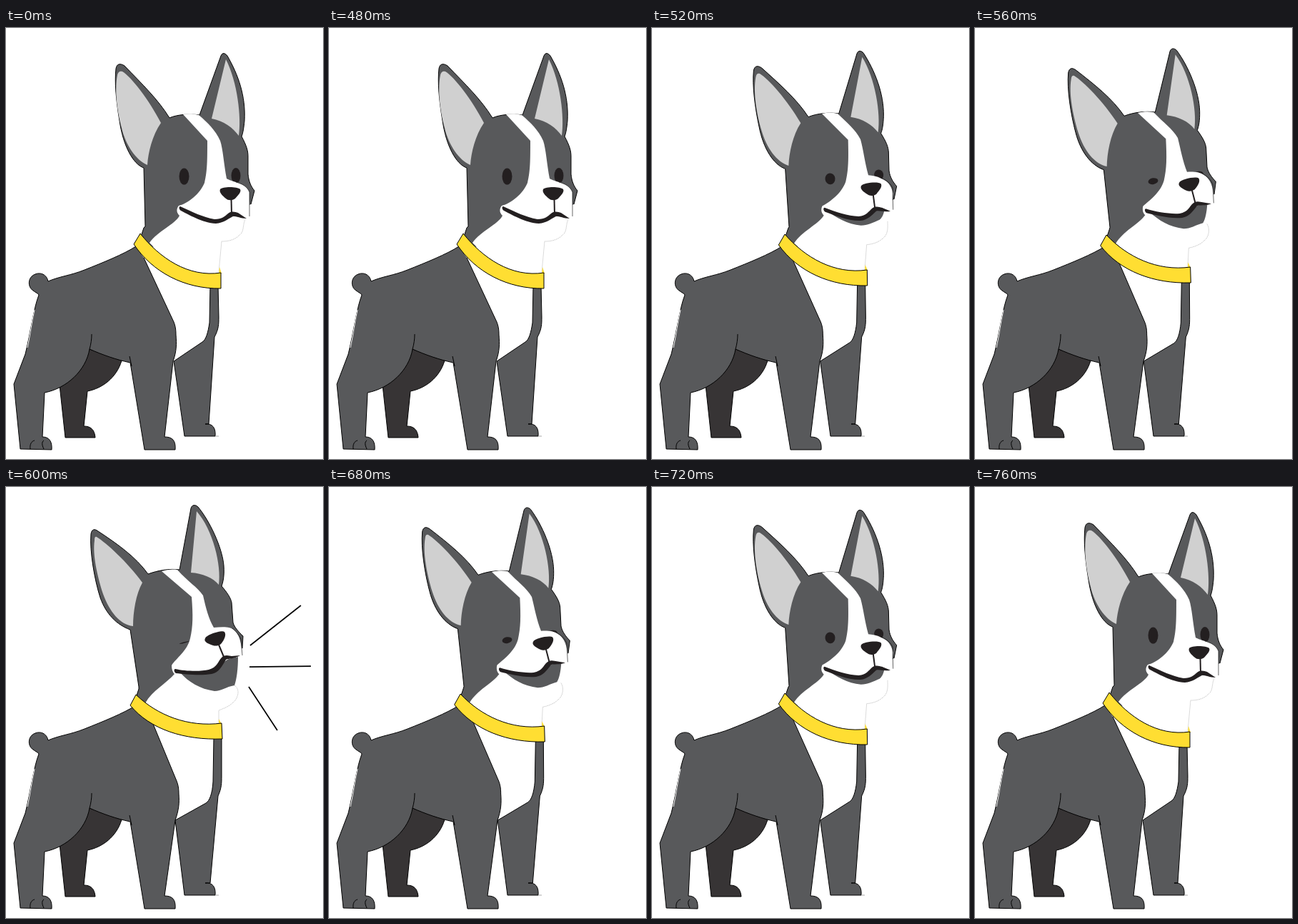
These frames come from a looping animation (444 by 604 pixels, 1200 ms). An HTML page with a canvas:

```html
<!DOCTYPE html>
<html lang="en">
<head>
<meta charset="utf-8">
<title>Barking dog</title>
<style>
html, body { margin: 0; width: 100%; height: 100%; overflow: hidden; background: #fff; }
canvas { display: block; }
</style>
</head>
<body>
<canvas id="stage" width="444" height="604"></canvas>
<script>
const ctx = document.getElementById('stage').getContext('2d');
const LOOP = 1200, STEP = 40;
const GREY = '#58595b', DARK = '#373435', INK = '#231f20', EAR = '#d0d0d0', YELLOW = '#ffde32';
let bark = 0; // 0 = calm, 1 = head thrown back

const mix = (a, b) => a + (b - a) * bark;

// Blends two paths of the same structure.
function blend(calm, loud = calm) {
  const ends = loud.match(/[\d.]+/g);
  let i = 0;
  return new Path2D(calm.replace(/[\d.]+/g, n => mix(+n, +ends[i++])));
}

function paint(path, fill, stroke, width = 1) {
  if (fill) {
    ctx.fillStyle = fill;
    ctx.fill(path);
  }
  if (stroke) {
    ctx.strokeStyle = stroke;
    ctx.lineWidth = width;
    ctx.stroke(path);
  }
}

function eye(x, y, rx, ry, tilt) {
  const path = new Path2D();
  path.ellipse(x, y, rx, ry, tilt, 0, Math.PI * 2);
  paint(path, INK);
}

function drawLegsAndBody() {
  paint(blend('M75 500L83 574L125 574C124 562 118 558 109 558L114 509C135 505 155 490 162 466L117 450Z'), DARK, '#000');

  const farPaw = 'L250 572L293 572C294 560 289 554 279 555';
  paint(blend(
    'M286 360L285 413C283 427 280 437 275 440L235 467' + farPaw + 'L284 555L292 433C298 422 298 415 298 405L297 360Z',
    'M291 350L290 413C289 430 285 440 280 443L237 467' + farPaw + 'L286 555L297 433C302 422 302 415 302 405L302 350Z'
  ), GREY, '#000');
  paint(blend('M293 572L298 572'), null, '#aaa');

  const back = 'M182 306C165 317 135 329 110 339C90 347 75 348 59 355C57 345 48 342 41 345'
    + 'C30 349 30 363 38 368C42 371 45 372 46 374C38 395 35 425 27 457L11 499L20 590';
  const under = 'L64 591C65 579 60 573 51 573L54 511C85 505 112 480 117 450C135 458 155 465 174 469'
    + 'L194 591L237 591C238 578 233 573 222 573';
  paint(blend(
    back + under + 'L234 467C239 453 239 443 238 430C238 422 237 417 235 412L193 322',
    back + under + 'L237 467C242 453 243 443 242 430C242 422 241 417 239 412L206 332'
  ), GREY, '#000');

  paint(blend('M117 450C119 443 120 436 120 429M173 460L176 474'), null, '#000');
  paint(blend('M34 590C33 583 36 579 40 578M53 590C50 584 50 580 53 578'), null, '#000');
  paint(blend('M40 395C36 412 34 430 30 448'), null, '#fff');
}

function drawHead() {
  paint(blend(
    'M203 308L189 292L193 280L195 278L193 196C178 191 164 165 159 130C154 100 152 75 154 57C155 50 160 49 166 53C190 78 213 100 229 126'
      + 'C240 121 258 120 271 122L301 39C303 34 307 35 310 39C325 65 336 95 334 130C333 140 332 147 330 152'
      + 'C337 165 339 172 339 180L339 205C340 215 343 222 348 228L343 247',
    'M196 308L183 292L186 283L186 280L174 200C155 193 140 178 132 155C124 130 117 90 119 66C120 59 124 58 129 62C155 79 182 98 199 122'
      + 'C212 117 230 114 243 116L259 30C260 25 265 24 269 28C285 47 303 85 305 110C306 125 304 133 302 139'
      + 'C310 148 315 156 316 162L318 190C320 197 326 203 332 209L331 226'
  ), GREY, '#000');

  paint(blend(
    'M163 61C175 68 200 100 217 133C205 150 199 175 198 192C182 185 168 165 162 140C155 115 152 85 156 66C157 61 160 60 163 61Z',
    'M127 70C140 78 170 105 191 134C182 150 178 175 178 195C160 193 145 175 136 150C128 125 121 95 124 75C124 70 125 69 127 70Z'
  ), EAR);
  paint(blend(
    'M308 44L288 127C305 130 318 140 326 151C330 125 324 75 308 44Z',
    'M267 34L259 120C275 121 290 127 298 137C302 110 290 60 267 34Z'
  ), EAR);

  const tilt = -0.27 * bark;
  eye(mix(322, 309), mix(207, 204), 6.5, mix(11, 0.8), tilt);

  paint(blend(
    'M248 121L282 158C282 185 282 200 278 217C272 232 255 246 242 249C238 254 239 259 243 263C237 275 212 285 201 301'
      + 'L240 340L300 345L302 299C318 297 331 292 333 285L341 264L341 230C338 222 330 218 322 216'
      + 'C315 214 311 212 309 211C305 190 304 170 300 158C293 143 283 133 270 122C262 120 255 120 248 121Z',
    'M218 118L260 154C262 180 262 195 258 212C254 230 238 240 232 250C232 256 234 260 236 262C225 275 205 285 195 303'
      + 'L240 329L298 333L298 313C310 310 326 298 325 288L320 278L331 236C330 215 325 205 320 201'
      + 'C317 198 314 196 310 196L291 197C284 185 280 170 276 152C268 140 255 133 240 116C232 115 225 116 218 118Z'
      .replace('L291 197C', 'C304 196 298 196 291 197C')
      .replace('C317 198 314 196 310 196C304 196 298 196 291 197', 'C314 195 303 196 291 197')
  ), '#fff');

  paint(blend('M341 264L341 230C338 222 330 218 322 216', 'M331 236C332 227 331 219 329 213C326 207 322 202 317 198'.replace('C332 227 331 219 329 213', 'L329 213')), null, '#000', 0.6);

  // Open mouth
  paint(blend(
    'M246 254C265 263 290 273 300 271C308 266 315 261 322 262L326 263C324 264 322 264 318 264C310 269 302 272 293 272C275 271 258 261 246 254Z',
    'M243 259C265 263 288 262 297 256C304 244 312 239 322 239L325 238C325 255 323 270 320 278C308 280 302 286 292 286C272 283 256 274 243 259Z'
  ), GREY);

  ctx.setLineDash([1, 1]);
  paint(blend(
    'M335 268C332 275 333 282 330 287C322 297 312 299 302 299L298 342',
    'M320 278C326 282 327 290 321 299C314 307 306 310 298 313L298 331'
  ), null, '#999', 0.7);
  ctx.setLineDash([]);

  paint(blend(
    'M244 250C262 258 275 265 292 268C303 268 306 264 311 260C316 256 321 258 325 259L337 267'
      + 'C328 267 321 263 317 264C310 268 305 273 294 274C275 273 255 261 245 256C242 254 242 250 244 250Z',
    'M237 255C250 258 272 259 284 256C296 253 297 244 302 239C307 234 313 237 316 237L328 236'
      + 'C320 241 312 240 308 242C302 252 298 260 288 262C270 265 250 262 238 261C235 259 235 255 237 255Z'
  ), INK);
  paint(blend('M315.5 239L316 261', 'M298 221L305 238'), null, INK, 2);
  paint(blend(
    'M300 226C303 222 324 222 328 226C330 230 325 234 321 239C317 242 311 242 308 239C303 235 298 230 300 226Z',
    'M279 212C281 207 302 200 306 203C309 207 306 214 301 220C297 223 293 223 290 222C284 220 276 217 279 212Z'
  ), INK);
  eye(mix(249.5, 249.5), mix(208, 218), 7, mix(11.5, 0.8), tilt);
}

function drawCollar() {
  paint(blend('M299 335L302 344L298 344Z', 'M298 325L302 332L298 332Z'), YELLOW);
  paint(blend(
    'M188 288L179 303C205 342 250 366 301 365L301 343C255 350 215 322 188 288Z',
    'M182 291L174 306C202 340 250 355 303 353L302 331C255 337 212 320 182 291Z'
  ), YELLOW, '#000');
}

// The head moves in thirds, one third per step, and holds the bark for two steps.
function barkAt(time) {
  const step = Math.floor(time / STEP);
  const up = step - 12, down = 19 - step;
  return Math.max(0, Math.min(up, down, 3)) / 3;
}

function frame(now) {
  bark = barkAt(now % LOOP);
  ctx.fillStyle = '#fff';
  ctx.fillRect(0, 0, 444, 604);
  ctx.lineJoin = 'round';
  drawLegsAndBody();
  drawHead();
  drawCollar();
  if (bark === 1) {
    paint(new Path2D('M342 222L413 166M341 252.2L427 251.2M340 280L380 341'), null, '#000', 1.7);
  }
  requestAnimationFrame(frame);
}

requestAnimationFrame(frame);
</script>
</body>
</html>
```
